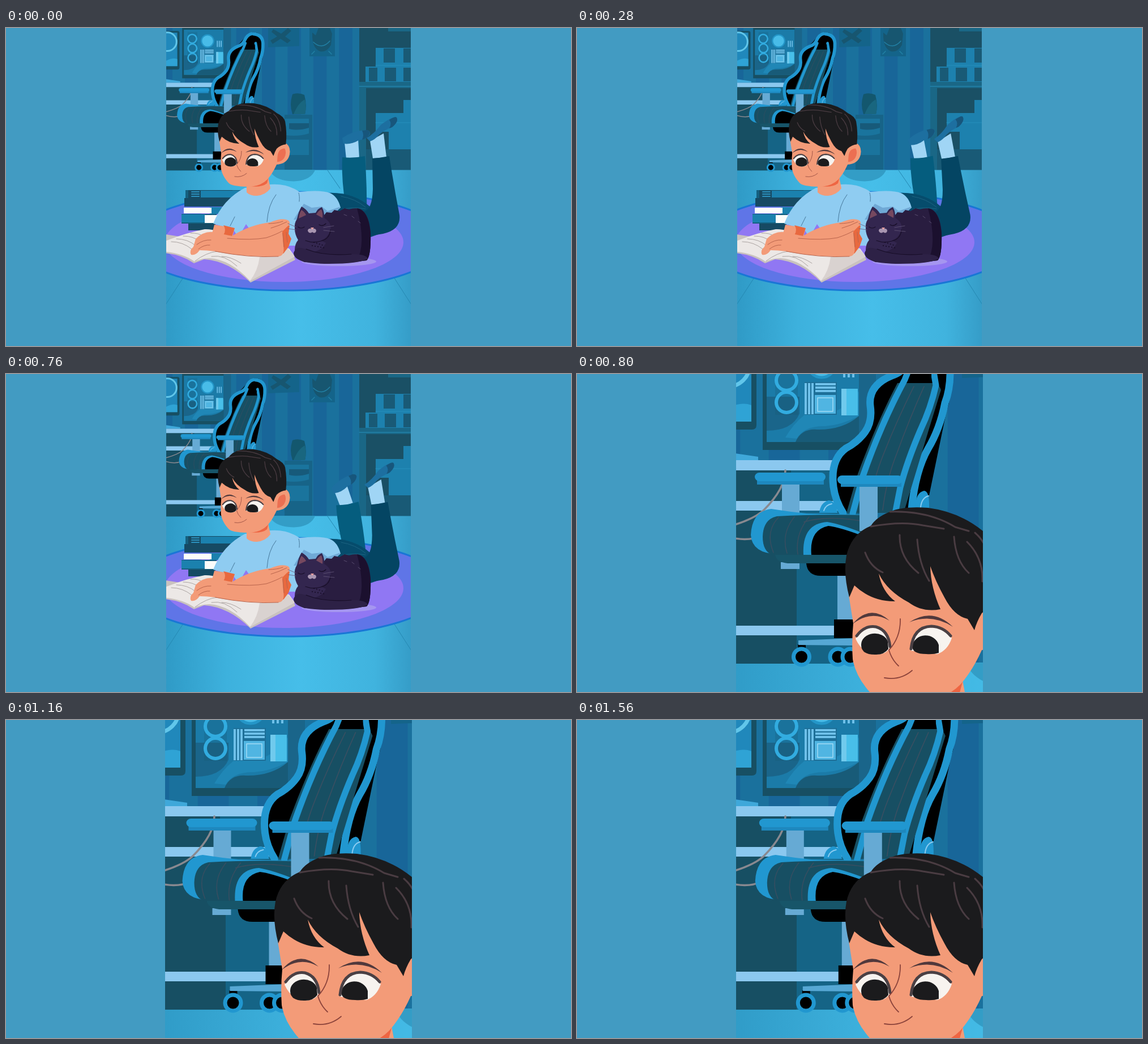
Recreate the animation shown at these times as an HTML page. Size 998 by 561 pixels, loop 1.6 s.

```html
<!DOCTYPE html>
<html lang="en">
<head>
<meta charset="utf-8">
<title>Reading on the rug</title>
<style>
html, body { margin: 0; height: 100%; overflow: hidden; background: #429bc2 }
svg { display: block; width: 998px; height: 561px }
.line { fill: none; stroke-linecap: round; stroke-linejoin: round }
.blue { fill: #2197d0 }
.steel { fill: #66aad4 }
.teal { fill: #174f63 }
.skin { fill: #f39b78 }
.trim { stroke: #2197d0 }
</style>
</head>
<body>
<svg viewBox="0 0 998 561">
<defs>
  <clipPath id="panel"><rect id="window" y="0" height="561"/></clipPath>
  <linearGradient id="floor">
    <stop offset="0" stop-color="#2f9ac6"/><stop offset=".25" stop-color="#3db1dd"/>
    <stop offset=".55" stop-color="#46bee9"/><stop offset=".85" stop-color="#40b3de"/><stop offset="1" stop-color="#359cc7"/>
  </linearGradient>
  <pattern id="stripes" x="452" width="45.4" height="300" patternUnits="userSpaceOnUse">
    <rect width="46" height="300" fill="#1a719d"/><rect width="23.7" height="300" fill="#186699"/>
  </pattern>
</defs>
<g clip-path="url(#panel)">
<g id="scene">

  <!-- wall -->
  <rect x="281" width="436" height="252" fill="url(#stripes)"/>
  <path fill="#14648a" d="M463 0h55v32l-55 2zM536 0h45v50h-45z"/>
  <path fill="#175670" d="M472 2l14 8 12-10 6 5-11 10 10 7-6 5-12-8-14 9-4-6 12-7-10-8zM541 8l6 5 5-13h20l4 10-2 20q-8 14-20 11-14-6-13-33z"/>
  <path class="line" stroke="#2180a5" stroke-width="1.5" d="M543 25q15 14 29-2M545 41l-5 5M570 41l5 5"/>
  <path fill="#176488" d="M492 153h49v97h-49z"/>
  <path fill="#1a749d" d="M493 160h42v26q-18 6-42 3zM493 197h42v27h-42z"/>
  <path fill="#175a7a" d="M500 168h35v8q-18 6-35 2z"/>
  <path fill="#13576e" d="M506 117q10-4 21 1 5 18 1 34h-22q-6-17 0-35z"/>
  <path fill="#19667f" d="M528 126q-12 6-20 26h20q3-12 0-26z"/>

  <!-- shelves -->
  <rect x="624" width="93" height="251" fill="#1a5065"/>
  <path fill="#1a6786" d="M624 95h93v11h-93zM636 106h-12v145h12zM675 0h42v6h-42z"/>
  <path fill="#1d81ae" d="M653 35h64v60h-82V68h18zM653 150h49v-23h15v56h-64zM676 183h41v31h-41z"/>
  <path fill="#195a76" d="M667 36h20v25h-20zM702 36h14v25h-14zM641 70h15v24h-15zM669 70h20v24h-20zM702 70h14v24h-14zM636 214h81v37h-81z"/>
  <path class="line" stroke="#2690bd" d="M653 66h63M624 103h92M653 167h63"/>

  <rect x="281" y="250.5" width="436" height="311" fill="url(#floor)"/>
  <path fill="#339dc6" d="M466 250.5h80q-8 19-38 20-35-1-42-20z"/>
  <path class="line" stroke="#2487b1" d="M312 442l-30 46M682 435l34 53M568 251l22 32"/>

  <!-- drawn at close-up size -->
  <g transform="scale(.43103) translate(394 72)">
    <path class="teal" d="M258-60h51q8 0 8 8V90q0 8-8 8h-51zM328-72h176v206H328z"/>
    <path fill="#2088bb" d="M258-53h50V84h-50z"/>
    <path fill="#2fa3d5" d="M258 65q28-18 50-10v29h-50z"/>
    <circle class="line" cx="267" cy="-16" r="38" stroke="#61c6ea" stroke-width="7"/>
    <path fill="#1b7ba8" d="M335-65h163v185H335z"/>
    <path fill="#1a658a" d="M335 40h58v30q-13 30-58 30zM498-72h30v200h-30z"/>
    <path fill="#238fc0" d="M402 72h35q38-8 61-42v44q-30 16-60 18-36-1-50 22l-20-2q14-24 34-40z" opacity=".6"/>
    <path fill="#185b78" d="M386 120q10-24 38-22 45 1 74-24v46z"/>
    <path class="teal" d="M350-55h40V72h-40z" opacity=".2"/>
    <g class="line" stroke="#32ace0" stroke-width="6">
      <circle cx="369" cy="-28" r="18"/><circle cx="370" cy="11" r="18"/><circle cx="370" cy="50" r="18"/>
    </g>
    <circle cx="432" cy="-19" r="25" fill="#48bce8" stroke="#2496c8" stroke-width="5"/>
    <path fill="#1d6f98" d="M402 14h57v58h-57z"/>
    <path fill="none" stroke="#6fc1ea" stroke-width="4" d="M404 16v55M410 16v55M416 16v55M421 18h36M421 24h36M421 30h36M472-20v26M480-20v26M488-20v26"/>
    <path fill="#50b5e2" d="M420 37h37v33h-37z"/>
    <path class="line" stroke="#a3dbf5" stroke-width="1.5" d="M425 42h27v24h-27z"/>
    <path fill="#48bfe9" d="M467 26h29v47h-29z"/><path fill="#8bd3f1" d="M467 26h9v47h-9z" opacity=".6"/>
    <path fill="#3fa8da" d="M258 137l62 9v6h-62z"/>

    <path fill="#156486" d="M258 168h242v343H258z"/>
    <path class="teal" d="M258 168h120v60H258zM258 240h130v271H258z"/>
    <path fill="#8bc8ef" d="M258 152h242v18H258zM258 224h242v17H258zM258 444h242v17H258z"/>
    <path class="line" stroke="#898990" stroke-width="3.5" d="M368 170q0 32-38 70-19 18-72 32M258 285q42 13 68 0"/>

    <g id="chair">
      <path class="steel" d="M362 193h31v55h-31zM460 350h32v86h-32zM360 332h33v12h-33z"/>
      <path d="M620-54q38 0 42 45 2 40-10 78l-30 145-22 30H470q-24-37-23-70 3-38 37-56 33-17 30-54-4-38 32-58 25-20 40-42 13-18 34-18z"/>
      <path class="line trim" stroke-width="13" d="M612-48q-17 3-29 28-8 17-27 23-42 17-38 53 4 28-9 46-13 18-34 29-28 20-22 68 3 24 17 46M619-48q38 3 40 38 1 35-9 61-9 46-30 81-22 38-29 106"/>
      <path class="teal" d="M566 16l66 0q8 3 11 12l-20 65-46 152H476l19-66q35-95 71-163z"/>
      <path class="line trim" stroke-width="11" d="M587-10l-8 20q-42 78-74 170l-18 66M629-10l5 30q-9 40-27 78-24 56-36 102l-9 46"/>
      <path class="line" stroke="#3d4f62" stroke-width="1.5" d="M595 22q-30 60-53 118-18 44-28 100M613 22q-27 60-48 118-18 44-25 100"/>
      <path d="M592-4h34v18l-38-5z"/>
      <path class="blue" d="M428 245q2-18 16-22 14 0 16 22zM597 237q1-28 16-31 10 0 9 32z"/>
      <path class="line" stroke="#8acbf0" stroke-width="2" d="M436 241q3-10 14-12M607 235q2-17 14-20"/>
      <path class="blue" d="M307 284q2-42 36-46 32 5 63 8l105 2v70H356q-47-1-49-34z"/>
      <path class="teal" d="M328 287q1-31 25-36 70-4 158-2v70H345q-17-6-17-32z"/>
      <path class="line" stroke="#384e61" stroke-width="1.5" d="M356 253q-24 25-9 62M384 252q-24 30-13 64M410 252q-25 30-20 66M401 261q40-12 100-2"/>
      <path class="blue" d="M400 319q-3-55 42-58 25 4 69 22v36z"/>
      <path d="M414 319q-4-44 30-51 20 2 67 20v31zM405 334h106v22h-80q-24 0-26-22zM454 433h38v33h-38zM390 477h14v14h-14z"/>
      <path fill="#175569" d="M350 319h161v15H372q-20-2-22-15z"/>
      <path fill="#56a7d4" d="M391 470l100-4v13l-100-1z"/>
      <path class="steel" d="M499 197h32v80h-32z"/>
      <path fill="#1e88be" d="M318 184h118v11H318zM466 189h107v10H466z"/>
      <rect class="blue" x="314" y="174" width="125" height="15" rx="8"/>
      <rect class="blue" x="460" y="179" width="115" height="15" rx="8"/>
      <g class="trim" stroke-width="7"><circle cx="396.5" cy="499" r="14"/><circle cx="461" cy="499" r="14"/><circle cx="483" cy="499" r="14"/></g>
    </g>
  </g>

  <!-- rug and stack of books -->
  <ellipse cx="498" cy="376" rx="279" ry="87" fill="#5f75e7" stroke="#1976d6" stroke-width="3"/>
  <ellipse cx="491" cy="378" rx="211" ry="70" fill="#9077f3"/>
  <path fill="#15607f" d="M317 286h108v28H317zM310 328h62v17h-62z"/>
  <path fill="#164a63" d="M322 286h78v14h-78zM315 300h90v15h-90zM322 345h48v12h-48z"/>
  <path fill="#1b81ae" d="M344 287h80v12h-80zM310 329h42v14h-42zM360 316h22v12h-22z"/>
  <path class="line" stroke="#2c91bd" stroke-width="2" d="M328 289h13M328 293h13M328 297h13"/>
  <path fill="#fcfcfa" d="M314 317h49v10h-49zM351 330h24v14h-24z"/>

  <!-- legs -->
  <g id="farLeg">
    <g id="farFoot">
      <path fill="#a0d5f5" d="M598 202l24-5 2 32-23 2z"/>
      <path fill="#1d6fa0" d="M594 194q18-13 43-14 9 2 5 9-7 8-19 9-13 8-27 6z"/>
      <path fill="#17567c" d="M629 181l8-1q9 2 4 9-4 6-12 8 4-8 0-16z"/>
    </g>
    <path fill="#055d7e" d="M594 228q20 2 40-2 4 55 3 100h-34q-11-47-9-98z"/>
  </g>
  <path fill="#064c6c" d="M568 291q45-2 76 25l22 45-28 10-55-46z"/>
  <g id="nearLeg">
    <g id="nearFoot">
      <path fill="#a0d5f5" d="M643 199l24-13 5 42-24 2z"/>
      <path fill="#1d6fa0" d="M637 194q14-8 25-23 19-15 28-13 4 7-8 17-14 5-23 13-7 9-16 12z"/>
      <path fill="#17567c" d="M677 162q11-7 13-4 4 7-8 17l-5 2q5-8 0-15z"/>
    </g>
    <path fill="#044563" d="M647 230q15-1 30-4 8 52 18 104 3 26-29 33l-25 4-10-43q16-2 17-40z"/>
  </g>
  <path class="line" stroke="#1d6482" d="M592 297q25 4 43 19M596 319q20-3 39 0"/>

  <!-- shirt and neck -->
  <path fill="#8fccf1" d="M366 345q17-43 56-63l45-6q30-2 51 13 39-4 54 2 14 6 19 26l-76 67h-27l-80-18-6-10z"/>
  <path class="line" stroke="#46789b" d="M477 294q-14 18-16 48M517 291q2 5 1 15M396 349l8-16"/>
  <path fill="#70a9d6" d="M508 338l18-28 14 7 18-2 10 8 23-8-18 25z"/>
  <path fill="#9077f3" d="M424 346l10 14h-18z"/>
  <path class="skin" d="M425 274l38-12 4 21q-9 12-24 13-12 0-18-6z"/>
  <path fill="#ee6542" d="M430 279q22-3 34-16l-3 11q-10 8-31 5z"/>

  <!-- head, also at close-up size -->
  <g transform="scale(.43103) translate(394 72)">
    <path class="skin" d="M712 417q13-23 44-15 18 15 12 45-10 38-55 40z"/>
    <path fill="#ec6f52" d="M719 450q4-28 29-29 10 16-2 39-10 16-29 16z"/>
    <path class="skin" d="M480 390q4 25 8 50-3 30-1 63 5 30 30 58 8 9 25 12 35 6 70 4 40-4 65-29 22-25 38-61l4-107-80-80H490z"/>
    <path fill="#1b1b1d" d="M481 394q-11-42-5-74 9-38 43-52 10-16 34-25 22-10 67-7 55 7 97 41 27 12 33 34 8 45 3 93-20 1-38 18-9 15-13 30l-12-20q-24-5-41-38-16-29-25-55 1 38 18 76-32 6-56-12-38-20-53-51 6 32 29 49-41 1-72-28z"/>
    <path class="line" stroke="#4a3c42" stroke-width="3" d="M553 243q68-2 115 27l24 7M519 269q55-10 92-2l37 6M570 284q-1 40 33 67M601 292q3 43 21 73M509 315q9 25 31 35M666 287q3 43 26 64M689 296q29 29 27 70M703 280q26 22 29 70"/>
    <path fill="#f7f3ef" d="M492 467q14-22 35-20 22 4 26 33-4 15-26 15-23-2-35-28zM590 488q4-44 38-42 23 3 34 20-7 21-25 28z"/>
    <path fill="#1b1b1d" d="M502 478a24 20 0 0 1 47-6l1 13q-8 11-24 10-24 0-24-17zM592 480a24 22 0 0 1 47-2v14q-10 3-22 2-25 0-25-14z"/>
    <path class="line" stroke="#4a4044" stroke-width="5" d="M494 462q14-19 34-16 22 6 25 35M590 485q4-39 36-40 21 1 34 17"/>
    <path fill="#51393c" d="M487 441q30-36 65-6-33-19-65 6zM587 438q41-27 77 8-38-24-77-8z"/>
    <path class="line" stroke="#8b433b" stroke-width="1.8" d="M571 432q1 32-20 55 5 17 17 28M543 536q28 5 49-13"/>
  </g>

  <!-- open book -->
  <path fill="#c9c2bf" d="M281 397q30 3 51 18l18-7q44 3 82 41l79-40-4-10-226-35z"/>
  <path fill="#ece8e6" d="M276 378q42-17 75-23 20-1 55 14l94 20 10 14-79 43q-35-38-72-40-14 0-26 6-20-15-57-18z"/>
  <path fill="#d9d2d0" d="M448 404l50-15 12 14-79 43q14-18 17-42z"/>
  <path class="line" stroke="#aaa3a1" d="M292 377q20 0 36 13M301 372q20 0 34 12M313 367q18 0 28 9M326 362q15-1 23 6M334 411q20-15 39-17M363 403q23-4 45 17M381 403q16 0 34 12"/>

  <!-- arms -->
  <path class="skin" d="M368 347l36 6-4 15q-17 10-40 10z"/>
  <path fill="#e8693f" d="M384 348l20 5-5 14-15-2q6-9 0-17z"/>
  <path fill="#e8693f" d="M478 352l23-4-2 15 5 9-5 14-9 12-20-14z"/>
  <path class="skin" d="M335 372q14-14 31-12l33 7q32-20 67-24 21-9 32-4 7 5-2 12l-8 8 2 25q3 18-9 19-66 1-112-9-15-2-27-2-7 10-15 8-4-7 4-14z"/>
  <path class="line" stroke="#b9644c" d="M337 382q12-9 25-8M340 390q10-8 20-7M391 371q43 4 69-1 18-6 28-12M370 394q60 12 111 9M464 345q14 0 25-4M468 353q14-4 28-11M495 360l2 18M489 362l2 24"/>

  <!-- cat -->
  <ellipse cx="588" cy="412" rx="66" ry="8" fill="#a596f0"/>
  <path fill="#291d40" d="M548 340l14-10 4-5 9 1 5-5 9 2 9-5 8 2q13-4 21 0 15 9 17 42 1 40-7 48-50 8-110 3-18-6-15-22z"/>
  <path fill="#1b102e" d="M620 318q20 3 24 44 1 40-7 48l-18 2q18-30 1-94z"/>
  <path fill="#33264f" d="M510 354q-1-10 4-17 3-14 8-22 8 4 13 12l12-1q4-8 11-10 5 9 4 19 14 8 11 22-5 14-17 18l9 4q-5 13-28 18l-27-5q0-11 6-18-6-10-6-20z"/>
  <path fill="#76485f" d="M517 336q1-10 5-15 6 4 8 9zM548 329q4-7 9-9 3 6 2 15z"/>
  <path fill="#2d2146" d="M508 397q4-14 21-7 35 12 78 9 29-1 32 8-15 9-69 9-62 0-62-19z"/>
  <path class="line" stroke="#170d27" stroke-width="1.2" d="M516 351q5 4 11 0M553 347q6 4 12-2M573 356q-1 16-17 20-14 4-27-1M530 390q32 13 80 9"/>
  <path class="line" stroke="#665a7b" stroke-width=".8" d="M561 352l18-3M561 357l19 2M512 351l-14-6M512 356l-14-2M597 329l5 2M611 332l4 3M622 341l4 3"/>
  <path class="line" stroke="#170d27" stroke-width="2" stroke-dasharray=".1 5" d="M544 378l15 5M541 384l22 4"/>
  <path fill="#a996b1" d="M540 354q-7-1-7 4 3 6 8 2 5 4 7-2 0-5-8-4z"/>
  <path fill="#e8a0a0" d="M538 352h6l-3 4z"/>
</g>
</g>
</svg>
<script>
const el = id => document.getElementById(id);
const set = (id, value) => el(id).setAttribute('transform', value);
const turn = (id, angle, x, y) => set(id, `rotate(${angle} ${x} ${y})`);

function draw() {
  // 15 drawings per second, shown on a 40 ms clock; two shots of 12 drawings
  const step = Math.floor(Math.floor(performance.now() % 1600 / 40) * .6);
  const close = step >= 12;
  const u = step % 12 / 11;
  const glide = 1.5 * u - .5 * u * u;
  const swing = -2.4 * Math.sin(2.6 * u);

  set('scene', close ? 'translate(-394 -72) scale(2.32)' : '');
  el('window').setAttribute('x', close ? 281 : 283);
  el('window').setAttribute('width', close ? 436 : 432);
  set('chair', `translate(${7.8 * glide})`);
  turn('farLeg', -6.2 * glide, 622, 330);
  turn('farFoot', -9 * glide, 611, 229);
  turn('nearLeg', swing, 668, 345);
  turn('nearFoot', swing, 660, 228);
  requestAnimationFrame(draw);
}
draw();
</script>
</body>
</html>
```
